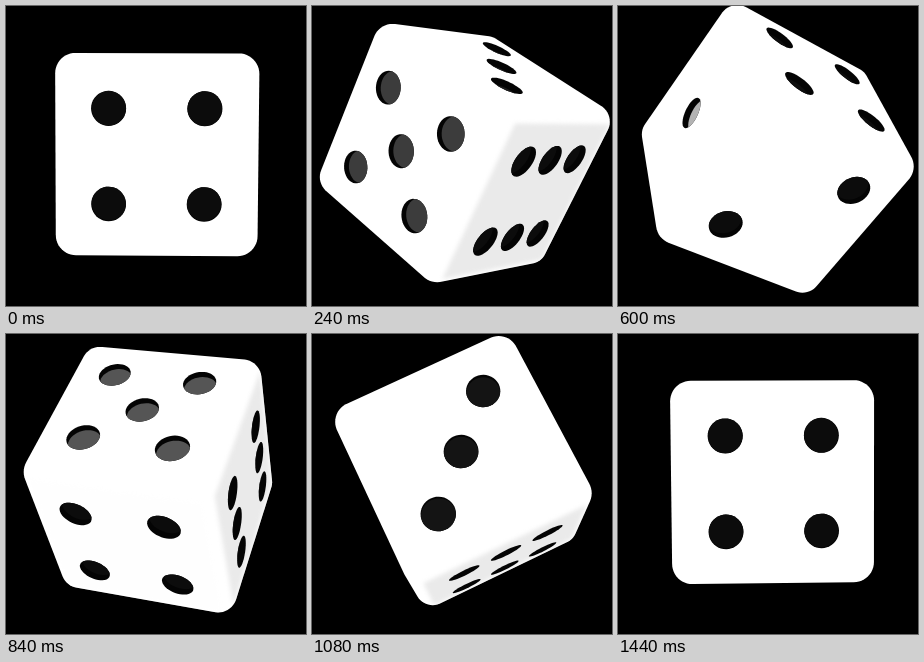
An HTML page with a canvas that plays this animation: 300 by 300 pixels, repeating every 1470 ms.

```html
<!DOCTYPE html>
<html lang="en">
<head>
<meta charset="utf-8">
<title>Rolling die</title>
<style>
  html, body { margin: 0; width: 100%; height: 100%; overflow: hidden; background: #000; }
  canvas { display: block; width: 300px; height: 300px; }
</style>
</head>
<body>
<canvas id="stage" width="300" height="300"></canvas>
<script>
const ctx = document.getElementById('stage').getContext('2d');

const STEP = 30, STEPS = 49, TURN = 24;
const CX = 152, CY = 143.5, CAM = 10, FOCAL = 934;
const ROUND = 0.2, GRID = 0.4625, PIP = 0.1685, DEPTH = 0.07;
const RAD = Math.PI / 180;

const clamp = (v, lo, hi) => Math.max(lo, Math.min(hi, v));
const grey = v => { const g = Math.round(v); return `rgb(${g},${g},${g})`; };

// One full turn about an axis that drifts, then swings back at the end.
function poseAt(step) {
  const n = step && (step - 1) % TURN + 1;
  const drift = 2 ** (-n / 4);
  const lag = 15.5 * Math.max(0, Math.sin(Math.PI * n / TURN)) ** 0.4;
  const angle = (4 + 360 * n / TURN - lag) * RAD;
  const heading = (-35 + 23.4 * drift + 65 * 4 ** (n - TURN)) * RAD;
  const z = 0.1 - 0.16 * drift, flat = Math.sqrt(1 - z * z);
  return rotator([flat * Math.cos(heading), flat * Math.sin(heading), z], angle);
}

function rotator([x, y, z], angle) {
  const cos = Math.cos(angle), sin = Math.sin(angle);
  return ([a, b, c]) => {
    const k = (x * a + y * b + z * c) * (1 - cos);
    return [
      a * cos + (y * c - z * b) * sin + x * k,
      b * cos + (z * a - x * c) * sin + y * k,
      c * cos + (x * b - y * a) * sin + z * k
    ];
  };
}

function project([x, y, z]) {
  const s = FOCAL / (CAM - z);
  return [CX + x * s, CY - y * s, s];
}

function onFace(axis, side, a, b, height) {
  const p = [0, 0, 0];
  p[axis] = side * height;
  p[(axis + 1) % 3] = a;
  p[(axis + 2) % 3] = b;
  return p;
}

function pipsOf(count) {
  const pips = count % 2 ? [[0, 0]] : [];
  if (count > 1) pips.push([-1, -1], [1, 1]);
  if (count > 3) pips.push([-1, 1], [1, -1]);
  if (count > 5) pips.push([0, -1], [0, 1]);
  return pips;
}

function convexHull(points) {
  points.sort((p, q) => p[0] - q[0] || p[1] - q[1]);
  const chain = list => {
    const out = [];
    for (const p of list) {
      while (out.length > 1) {
        const [a, b] = out.slice(-2);
        if ((b[0] - a[0]) * (p[1] - a[1]) - (b[1] - a[1]) * (p[0] - a[0]) > 0) break;
        out.pop();
      }
      out.push(p);
    }
    out.pop();
    return out;
  };
  const lower = chain(points);
  return lower.concat(chain(points.reverse()));
}

function trace(points) {
  ctx.beginPath();
  points.forEach(p => ctx.lineTo(p[0], p[1]));
  ctx.closePath();
}

function ring(count, fn) {
  return Array.from({ length: count }, (_, i) => {
    const a = i / count * Math.PI * 2;
    return fn(Math.cos(a), Math.sin(a));
  });
}

// silhouette of a cube with spherical corners
function outline(turn) {
  const ends = [ROUND - 1, 1 - ROUND], points = [];
  for (const x of ends) for (const y of ends) for (const z of ends) {
    const [px, py, s] = project(turn([x, y, z]));
    points.push(...ring(48, (cos, sin) => [px + cos * ROUND * s, py + sin * ROUND * s]));
  }
  return convexHull(points);
}

function drawFace(turn, axis, side) {
  const n = turn(onFace(axis, side, 0, 0, 1));
  if (n[2] * CAM <= 1) return;
  const place = (a, b, h) => project(turn(onFace(axis, side, a, b, h)));

  const light = -0.3 * n[0] + 0.4 * n[1] + 0.8 * n[2];
  const shade = clamp((0.3 - light) * 90, 0, 21);
  if (shade > 0) {
    const e = 0.87;
    trace([[-e, -e], [e, -e], [e, e], [-e, e]].map(([a, b]) => place(a, b, 0.98)));
    ctx.filter = 'blur(2px)';
    ctx.fillStyle = grey(255 - shade);
    ctx.fill();
    ctx.filter = 'none';
  }

  const glow = Math.max(0, 0.7 * n[1] - 0.8 * n[0]);
  const floor = grey(12 + 205 * glow * glow);
  for (const [a, b] of pipsOf(side > 0 ? 6 - axis : 1 + axis)) {
    const disc = h => trace(ring(40, (cos, sin) =>
      place(a * GRID + cos * PIP, b * GRID + sin * PIP, h)));
    ctx.save();
    disc(1);
    ctx.fillStyle = '#040404';
    ctx.fill();
    ctx.clip();
    disc(1 - DEPTH);
    ctx.fillStyle = floor;
    ctx.fill();
    ctx.restore();
  }
}

function draw(step) {
  const turn = poseAt(step);
  ctx.fillStyle = '#000';
  ctx.fillRect(0, 0, 300, 300);
  ctx.save();
  trace(outline(turn));
  ctx.fillStyle = '#fff';
  ctx.fill();
  ctx.clip();
  for (let axis = 0; axis < 3; axis++) {
    drawFace(turn, axis, 1);
    drawFace(turn, axis, -1);
  }
  ctx.restore();
}

function tick() {
  draw(Math.floor(performance.now() / STEP) % STEPS);
  requestAnimationFrame(tick);
}
tick();
</script>
</body>
</html>
```
